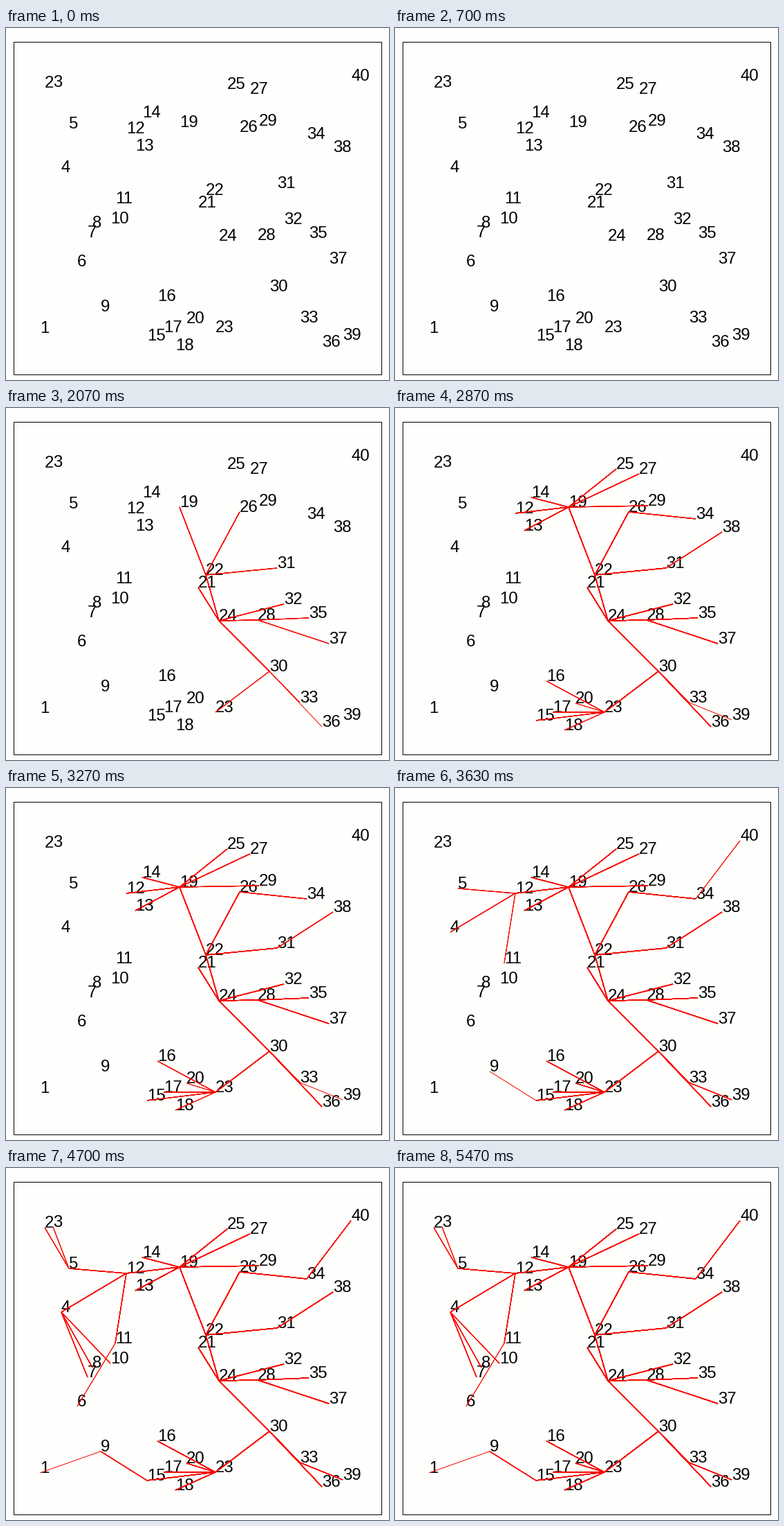
Write a matplotlib script that moves like this. It is 554 by 508 pixels and loops after 8130 ms.

```python
from math import hypot

import matplotlib.pyplot as plt
from matplotlib.animation import FuncAnimation
from matplotlib.collections import LineCollection
from matplotlib.patches import Rectangle

W, H, DPI = 554, 508, 64
PX = 72 / DPI
STEP, LOOP = 30, 8130
PAPER = "#fefefc"

# Scattered sites, numbered from 1 in order of x.
SITES = [
    (49, 440), (56, 86), (68, 85), (80, 208), (91, 145), (103, 344),
    (118, 302), (125, 288), (137, 409), (151, 282), (158, 253), (174, 152),
    (187, 177), (197, 129), (204, 451), (219, 394), (228, 439), (245, 465),
    (251, 143), (261, 426), (278, 259), (289, 241), (303, 439), (308, 307),
    (320, 88), (338, 150), (353, 95), (364, 306), (366, 141), (381, 380),
    (392, 231), (402, 283), (425, 425), (435, 160), (438, 303), (457, 460),
    (467, 340), (473, 179), (487, 450), (499, 76),
]
ROOT = 24
REACH, X_SCALE = 106.3, 0.9  # the plot is stretched sideways
LEVEL_TIMES = [1370, 2070, 2870, 3630, 4270]


def near(a, b):
    return hypot(X_SCALE * (a[0] - b[0]), a[1] - b[1]) <= REACH


def flood(root):
    """Breadth-first search: the list of new edges for each level."""
    unseen = [site for site in SITES if site != root]
    level, front = [], [root]
    levels = []
    while front:
        level = []
        for site in front:
            found = [other for other in unseen if near(site, other)]
            unseen = [other for other in unseen if other not in found]
            level += [(site, other) for other in found]
        levels.append(level)
        front = [end for _, end in level]
    return levels


LEVELS = flood(SITES[ROOT - 1])


def strokes(time):
    """Each new edge restrokes all earlier ones, so old edges grow heavier."""
    edges = [edge for start, level in zip(LEVEL_TIMES, LEVELS)
             if start < time for edge in level]
    return [edge for n in range(len(edges)) for edge in edges[:n + 1]]


fig = plt.figure(figsize=(W / DPI, H / DPI), dpi=DPI, facecolor=PAPER)
ax = fig.add_axes([0, 0, 1, 1])
ax.set(xlim=(0, W), ylim=(H, 0))
ax.axis("off")

ax.add_patch(Rectangle((11.5, 20.5), 532, 480, fill=False, snap=False,
                       edgecolor="black", linewidth=PX))
for label, (x, y) in enumerate(SITES, 1):
    ax.text(x, y, str(label), family="Liberation Sans", size=24 * PX,
            color="black", ha="left", va="baseline", zorder=2)

lines = LineCollection([], colors="#f80800", linewidths=PX,
                       capstyle="butt", zorder=3)
lines.set_snap(False)
ax.add_collection(lines, autolim=False)


def draw(i):
    lines.set_segments(strokes((i + 1) * STEP))
    return [lines]


anim = FuncAnimation(fig, draw, frames=LOOP // STEP, interval=STEP,
                     repeat=True, repeat_delay=0, blit=False)
plt.show()
```
